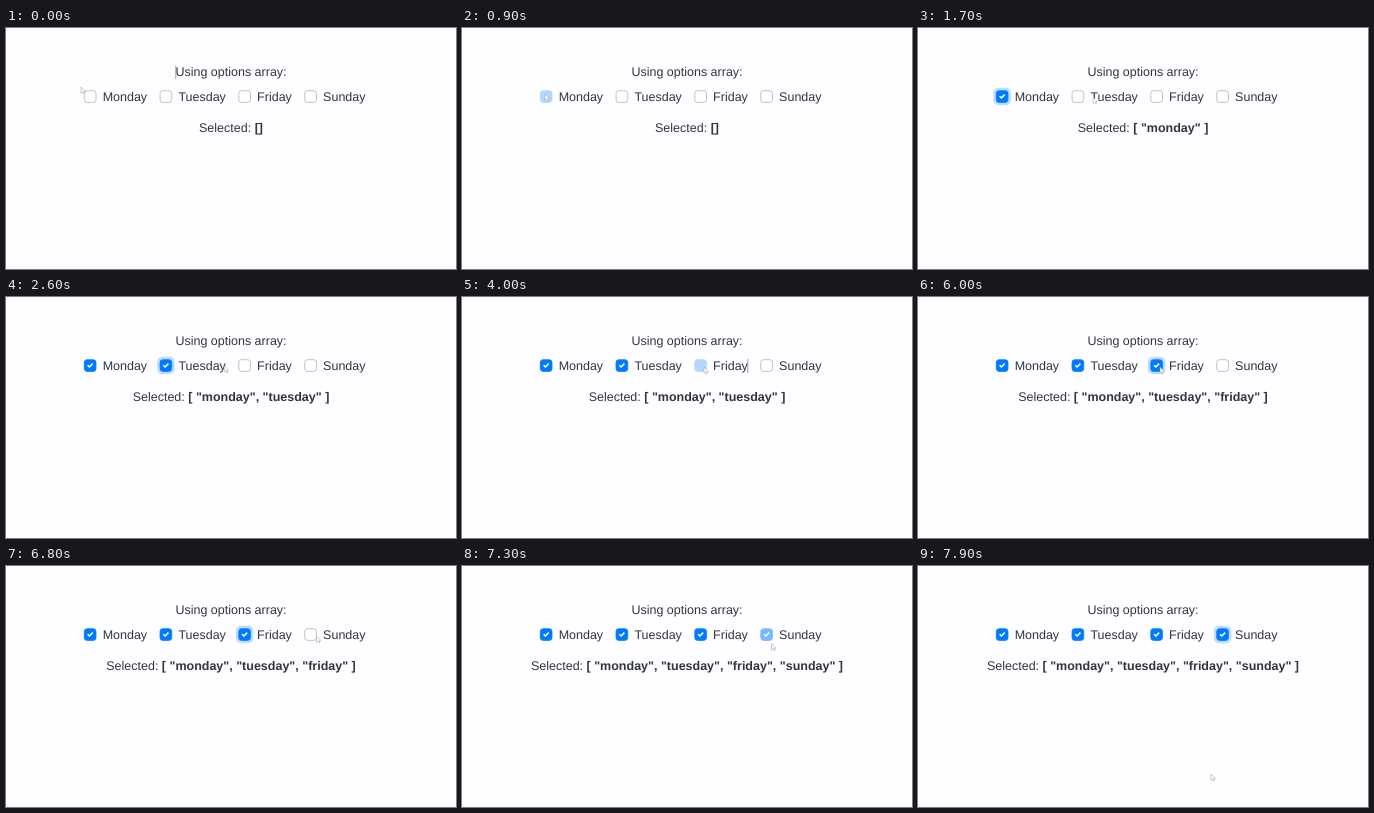
Animation, 450 px wide and 241 px high, one loop 8 s. Source, as an HTML page:

```html
<!DOCTYPE html>
<html lang="en">
<head>
<meta charset="utf-8">
<title>Checkbox group</title>
<style>
  html, body { margin: 0; height: 100%; overflow: hidden; background: #fefdff; }
  svg { display: block; width: 100%; height: 100%; }
  text {
    font: 12.5px "Liberation Sans", Arial, sans-serif;
    fill: #2f3640;
    text-rendering: geometricPrecision;
  }
  .bold { font-weight: bold; }
</style>
</head>
<body>
<svg id="stage" viewBox="0 0 450 241">
  <text x="225" y="48.3" text-anchor="middle">Using options array:</text>
  <text x="225" y="104.2" text-anchor="middle">Selected: <tspan id="value" class="bold"></tspan></text>
  <path id="caret" stroke="#777" stroke-width=".7"/>
  <path id="cursor" d="M0 0V6.2L1.5 5L2.5 7L3.5 6.5L2.6 4.6H4.4Z" fill="#fff" stroke="#999" stroke-width=".5"/>
</svg>
<script>
const LOOP = 8000, STEP = 100, HOLD = 200;
const SIZE = 12.5, MARGIN = SIZE, INDENT = SIZE * 1.5, HALO = 2.5;
const WHITE = [255, 255, 255], GREY = [173, 181, 189], PALE = [179, 215, 255], BLUE = [0, 123, 255];
const [stage, value, caret, cursor] =
  ['stage', 'value', 'caret', 'cursor'].map(id => document.getElementById(id));

function add(parent, tag, attrs) {
  const el = document.createElementNS('http://www.w3.org/2000/svg', tag);
  for (const key in attrs) el.setAttribute(key, attrs[key]);
  return parent.appendChild(el);
}

// Each option is laid out after the width of the label before it
let left = 77.9;
const presses = { Monday: 800, Tuesday: 2200, Friday: 3900, Sunday: 7100 };
const options = Object.entries(presses).map(([label, press]) => {
  const g = add(stage, 'g', { transform: `translate(${left} 62.3)` });
  const outer = SIZE + 2 * HALO, inner = SIZE - .8;
  const halo = add(g, 'rect', { x: -HALO, y: -HALO, width: outer, height: outer, rx: 5, fill: '#bfdeff' });
  const box = add(g, 'rect', { x: .4, y: .4, width: inner, height: inner, rx: 2.8, 'stroke-width': .8 });
  const check = add(g, 'path', { d: 'M3.7 5.9L5.45 7.65L8.8 4.3', fill: 'none', stroke: '#fff', 'stroke-width': 1.6 });
  const text = add(g, 'text', { x: INDENT, y: 10.7 });
  text.textContent = label;
  left += INDENT + text.getComputedTextLength() + MARGIN;
  return { label, press, release: press + HOLD, halo, box, check };
});
stage.append(caret, cursor);

// Pointer moves, each eased from wherever the last one ended
const moves = [
  { from: 200, to: 500, x: 83, y: 66 },
  { from: 1500, to: 1700, x: 175, y: 69 },
  { from: 1700, to: 2000, x: 160, y: 67 },
  { from: 2450, to: 2700, x: 250, y: 70 },
  { from: 3200, to: 3600, x: 242, y: 70 },
  { from: 6000, to: 6600, x: 310.5, y: 70 },
  { from: 7200, to: 7900, x: 293, y: 208 }
];

const progress = (t, from, to) => Math.min(1, Math.max(0, (t - from) / (to - from)));
const smooth = k => k * k * (3 - 2 * k);
const lerp = (a, b, k) => a + (b - a) * k;
const mix = (a, b, k) => `rgb(${a.map((v, i) => Math.round(lerp(v, b[i], k)))})`;

function pointerAt(t) {
  let x = 75, y = 59;
  for (const m of moves) {
    const k = smooth(progress(t, m.from, m.to));
    x = lerp(x, m.x, k);
    y = lerp(y, m.y, k);
  }
  return [x, y];
}

function draw(t) {
  const chosen = options.filter(o => t >= o.release).map(o => `"${o.label.toLowerCase()}"`);
  value.textContent = chosen.length ? `[ ${chosen.join(', ')} ]` : '[]';

  options.forEach((o, i) => {
    const checked = t >= o.release;
    const start = checked ? o.release : o.press;
    const k = t < start ? 0 : progress(t, start - 50, start + STEP);
    const to = checked ? BLUE : PALE;
    o.box.setAttribute('fill', mix(checked ? PALE : WHITE, to, k));
    o.box.setAttribute('stroke', mix(checked ? PALE : GREY, to, k));
    o.check.setAttribute('opacity', +checked);
    const blur = options[i + 1]?.press ?? LOOP;
    o.halo.setAttribute('opacity', +(t > o.release && t < blur));
  });

  const typing = t >= 3800 && t < 4200;
  caret.setAttribute('d', typing ? 'M285.8 62V76' : t < 300 ? 'M169.8 37.5V51' : '');
  cursor.setAttribute('transform', `translate(${pointerAt(t)})`);
}

function tick() {
  const t = performance.now() % LOOP;
  draw(Math.floor(t / STEP) * STEP);
  requestAnimationFrame(tick);
}
tick();
</script>
</body>
</html>
```
